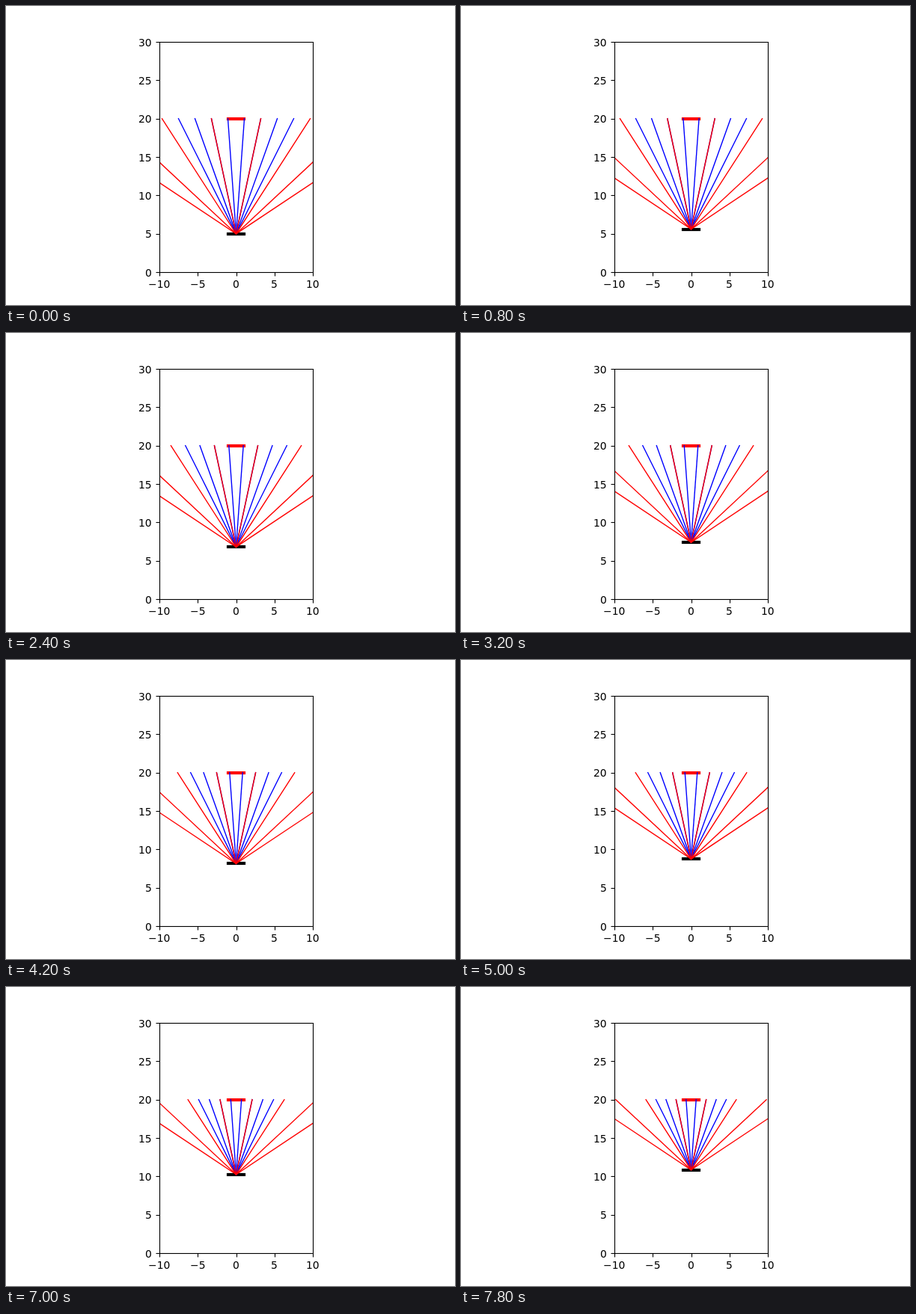
These frames come from a looping animation (600 px wide and 400 px high, 8000 ms). An HTML page with a canvas:

```html
<!DOCTYPE html>
<html lang="en">
<head>
<meta charset="utf-8">
<title>Ray fan plot</title>
<style>
  html, body { margin: 0; width: 100%; height: 100%; overflow: hidden; background: #fff; }
  canvas { display: block; }
</style>
</head>
<body>
<canvas id="stage" width="600" height="400"></canvas>
<script>
const ctx = document.getElementById('stage').getContext('2d');

const LOOP = 8000, STEP = 200;
const PT = 100 / 72;
const UNIT = 308 / 30;
const BOTTOM = 356, CENTER = 307.5;
const WALL_Y = 20, START_Y = 5, RISE = 0.15;

const px = x => CENTER + x * UNIT;
const py = y => BOTTOM - y * UNIT;
const crisp = v => Math.round(v) + 0.5;

function line(x1, y1, x2, y2, color, width, cap = 'square') {
  ctx.strokeStyle = color;
  ctx.lineWidth = width * PT;
  ctx.lineCap = cap;
  ctx.beginPath();
  ctx.moveTo(x1, y1);
  ctx.lineTo(x2, y2);
  ctx.stroke();
}

function bar(y, color) {
  const row = Math.round(py(y));
  line(Math.round(px(-1)), row, Math.round(px(1)), row, color, 3);
}

// Eight rays with evenly spaced slopes, ending at the wall height
function fan(y, spread, color) {
  for (let i = -7; i <= 7; i += 2) {
    const slope = spread * i / 14;
    line(px(0), py(y), px(slope * (WALL_Y - y)), py(WALL_Y), color, 1);
  }
}

function label(value, x, y, align) {
  const text = String(value).replace('-', '\u2212');
  ctx.fillText(text, Math.round(x - ctx.measureText(text).width * align), y);
}

function axes() {
  const left = crisp(px(-10)), right = crisp(px(10));
  const top = crisp(py(30)), bottom = crisp(BOTTOM);
  ctx.fillStyle = '#000';
  ctx.font = 10 * PT + 'px "DejaVu Sans", sans-serif';

  for (let x = -10; x <= 10; x += 5) {
    const col = crisp(px(x));
    line(col, bottom, col, bottom + 5, '#000', 0.8, 'butt');
    label(x, px(x), 377, 0.5);
  }
  for (let y = 0; y <= 30; y += 5) {
    const row = crisp(py(y));
    line(left - 5, row, left, row, '#000', 0.8, 'butt');
    label(y, px(-10) - 7 * PT, Math.round(py(y) + 5.5), 1);
  }

  ctx.lineWidth = 0.8 * PT;
  ctx.lineJoin = 'miter';
  ctx.strokeRect(left, top, right - left, bottom - top);
}

function draw(time) {
  const y = START_Y + RISE * Math.floor((time % LOOP) / STEP);
  ctx.fillStyle = '#fff';
  ctx.fillRect(0, 0, 600, 400);

  ctx.save();
  ctx.beginPath();
  ctx.rect(205, 48, 205, 308);
  ctx.clip();
  bar(y, '#000');
  bar(WALL_Y, '#f00');
  fan(y, 1, '#00f');
  fan(y, 3, '#f00');
  ctx.restore();

  axes();
}

let start;
function tick(now) {
  start ??= now;
  draw(now - start);
  requestAnimationFrame(tick);
}
draw(0);
requestAnimationFrame(tick);
</script>
</body>
</html>
```
